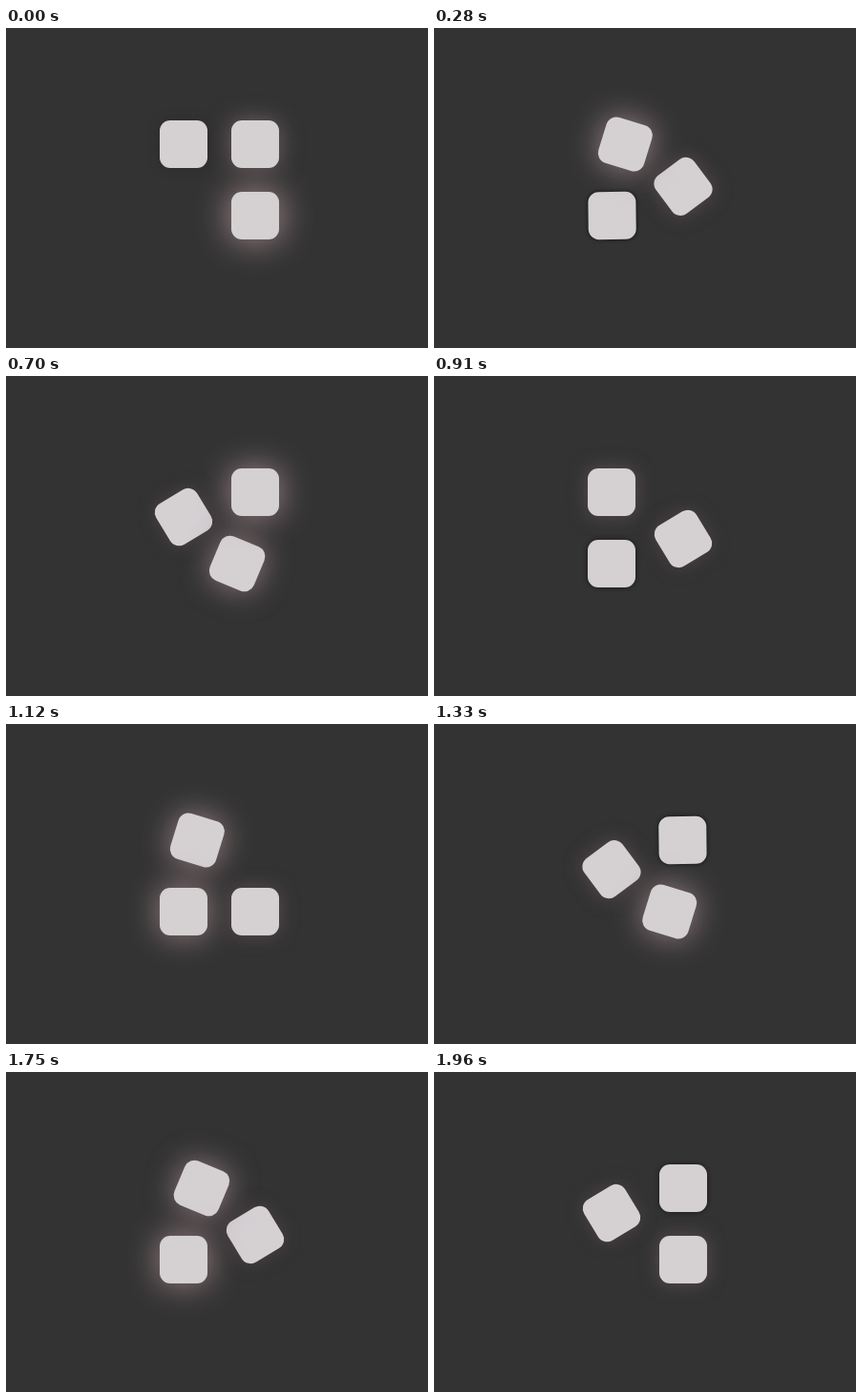
Write an HTML page that moves like this. It is 442x336 px and loops after 2030 ms.

```html
<!DOCTYPE html>
<html>
<head>
<meta charset="utf-8">
<style>
  html, body { margin: 0; width: 100%; height: 100%; overflow: hidden; background: #333; }
  i {
    position: absolute; left: 161px; top: 97px; width: 50px; height: 50px;
    border-radius: 11px; background: #d5d1d3;
  }
</style>
</head>
<body>
<i></i><i></i><i></i>
<script>
const LOOP = 2030, STEP = 70;
const MOVE = 262, STAGGER = 105, GAP = 75;
const STARTS = [-521, 20, 529, 1070, 1579, 2120];
// Clockwise from bottom right
const CORNERS = [[1, 1], [0, 1], [0, 0], [1, 0]];
const FIRST = [3, 2, 1];
const squares = [...document.querySelectorAll('i')];
const mix = (a, b, k) => a + (b - a) * k;

function pose(el, i, time) {
  const t = time - i * STAGGER;
  const k = STARTS.findLastIndex(s => s <= t);
  const u = t - STARTS[k];
  const p = Math.min(u / MOVE, 1);
  const from = CORNERS[(FIRST[i] + k) % 4], to = CORNERS[(FIRST[i] + k + 1) % 4];
  const x = GAP * mix(from[0], to[0], p), y = GAP * mix(from[1], to[1], p);
  el.style.transform = `translate(${x}px, ${y}px) rotate(${90 * p}deg)`;

  // The glow fades during a move and builds up again at rest
  const rest = STARTS[k + 1] - STARTS[k] - MOVE;
  const glow = u < MOVE ? 1 - p : (u - MOVE) / rest;
  const rgb = [190, 160, 166].map(c => mix(17, c, glow));
  el.style.boxShadow = `0 0 ${mix(4, 40, glow)}px rgb(${rgb})`;
}

const begin = performance.now();
function draw() {
  const t = (performance.now() - begin) % LOOP;
  squares.forEach((el, i) => pose(el, i, Math.floor(t / STEP) * STEP));
  requestAnimationFrame(draw);
}
draw();
</script>
</body>
</html>
```
